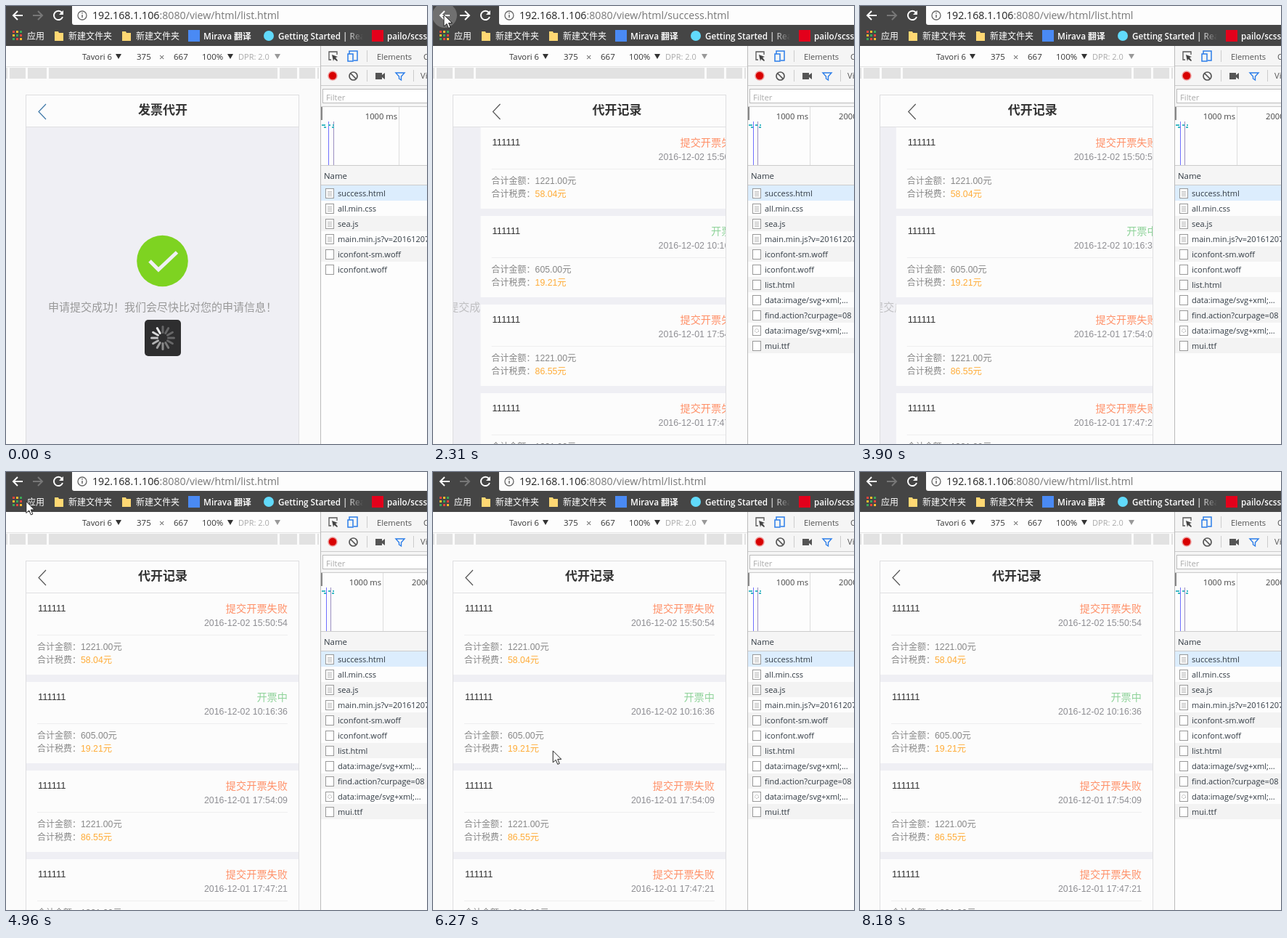
An HTML page for the animation above (8.67 s loop, 580 by 603 pixels).

```html
<!DOCTYPE html>
<html lang="zh">
<head>
<meta charset="utf-8">
<style>
html, body { margin: 0; width: 100%; height: 100%; overflow: hidden; background: #fbfbfb; }
svg { display: block; font-family: "Open Sans", "Noto Sans CJK SC", "Noto Sans CJK", sans-serif; }
.page { font-family: "Liberation Sans", "Noto Sans CJK SC", "Noto Sans CJK", sans-serif; }
.line { fill: none; }
</style>
</head>
<body>
<svg id="stage" width="580" height="603" viewBox="0 0 580 603"></svg>
<script>
const LOOP = 8670, SLIDE = 300, WIDTH = 376;
// Page slides, alternately list in and list out
const slides = [330, 2280, 3690, 5025, 5860, 7138, 7870];
// Pointer runs: [time, x, y]
const runs = [
  [[380, 232, 604], [600, 360, 500], [780, 436, 441], [1030, 436, 441], [1120, 405, 402], [1400, 130, 120],
   [1580, 33, 16], [1750, 33, 16], [2100, 15, 12], [2450, 15, 12], [2650, 17, 187], [3040, 232, 604]],
  [[4160, 232, 567], [4600, 100, 250], [5010, 18, 12], [5040, 18, 12], [5120, 17, 187], [5320, 232, 604]],
  [[6170, 232, 567], [6400, 80, 150], [6580, 27, 8], [6820, 27, 8], [6850, 31, 12], [7010, 31, 12],
   [7060, 18, 12], [7140, 18, 12], [7230, 17, 187], [7440, 232, 604]]
];
const hovers = [[1850, 2700], [4980, 5250], [7040, 7390]];

const text = (x, y, s, size = 11, fill = '#303942', more = '') =>
  `<text x="${x}" y="${y}" font-size="${size}" fill="${fill}" ${more}>${s}</text>`;
const rect = (x, y, w, h, fill, more = '') =>
  `<rect x="${x}" y="${y}" width="${w}" height="${h}" fill="${fill}" ${more}/>`;
const path = (d, stroke, width = 1, more = '') =>
  `<path class="line" d="${d}" stroke="${stroke}" stroke-width="${width}" ${more}/>`;
const shape = (d, fill) => `<path d="${d}" fill="${fill}"/>`;
const circle = (x, y, r, fill, more = '') => `<circle cx="${x}" cy="${y}" r="${r}" fill="${fill}" ${more}/>`;
const END = 'text-anchor="end"', BOLD = 'font-weight="bold"', SEMI = 'font-weight="600"';

// Label shown for inline pictures in the request list
const mime = 'image/svg+xml';
const inlineName = rest => ['data', mime].join(':') + ';' + rest;

function browserBar() {
  const folder = x => shape(`M${x} 35h5l1 2h6v11h-12z`, '#ffd873');
  const colors = ['#e8453c', '#f9bb2d', '#3aa757'];
  let apps = '';
  for (let i = 0; i < 9; i++)
    apps += rect(9 + i % 3 * 5, 34 + (i / 3 | 0) * 5, 3, 3, colors[(i + (i / 3 | 0)) % 3]);
  return rect(0, 0, 580, 55, '#454545') + circle(16, 13, 17, '#707070', 'id="hover"') +
    path('M23 13H10M16 7l-6 6 6 6', '#fff', 2) +
    path('M37 13H50M44 7l6 6-6 6', '#777', 2, 'id="next"') +
    path('M77 9a6.2 6.2 0 1 0 1 6', '#fff', 2) + shape('M79 6v6h-6z', '#fff') +
    rect(91, -4, 500, 30, '#fdfdfd', 'rx="3"') +
    circle(105, 13, 6, 'none', 'stroke="#666" stroke-width="1.3"') + path('M105 12v4M105 9v1.5', '#666', 1.5) +
    `<text x="119" y="18" font-size="14.2" fill="#222">192.168.1.106<tspan fill="#777" id="url"></tspan></text>` +
    apps + text(29, 46, '应用', 12, '#fff') +
    folder(67) + text(86, 46, '新建文件夹', 12, '#fff') +
    folder(160) + text(179, 46, '新建文件夹', 12, '#fff') +
    rect(251, 33, 16, 16, '#4a8af4') + text(272, 46, 'Mirava 翻译', 11.8, '#fff', SEMI) +
    circle(362, 41, 7, '#61dafb') + text(375, 46, 'Getting Started | Rea', 11.7, 'url(#fade)', SEMI) +
    rect(504, 33, 16, 16, '#e3001b') + text(525, 46, 'pailo/scss', 11.7, '#fff', SEMI);
}

function deviceBar() {
  const arrow = (x, fill) => shape(`M${x} 66h8l-4 7z`, fill);
  const ruler = [[0, 2], [5, 27], [30, 56], [59, 374], [377, 401], [404, 426], [429, 431]];
  return rect(0, 55, 433, 28, '#fdfdfd') + path('M0 83.5H433', '#e4e4e4') +
    text(146, 74, 'Tavori 6', 11.3, '#333', END) + arrow(151, '#333') +
    text(180, 74, '375', 11.5, '#333') + text(211, 75, '×', 13, '#666') + text(231, 74, '667', 11.5, '#333') +
    text(270, 74, '100%', 11.5, '#333') + arrow(305, '#333') +
    text(320, 74, 'DPR: 2.0', 11, '#aaa') + arrow(370, '#999') +
    ruler.map(([a, b]) => rect(a, 85, b - a, 15, '#e2e2e2')).join('');
}

const header = (title, id) => rect(28, 123, WIDTH, 43, '#fcfcfc') + path('M28 166.5h376', '#e0e0e2') +
  path('M55 135L45 145.5L55 156', '#555', 1.2, `id="${id}"`) +
  text(216, 149, title, 17, '#333', BOLD + ' text-anchor="middle"');

function successPage() {
  let spokes = '';
  for (let i = 0; i < 12; i++)
    spokes += path('M216 449.5v-8', '#fff', 3,
      `stroke-linecap="round" opacity="${Math.max(.27, (i - 1) / 11)}" transform="rotate(${i * 30} 216 457)"`);
  return header('发票代开', 'back1') + circle(215.5, 351, 35.3, '#7ed321') +
    path('M198 351L210 363L235.5 339', '#efeff4', 5) +
    text(58, 420, '申请提交成功！我们会尽快比对您的申请信息！', 15, '#999') +
    `<g id="loading">${rect(191, 432, 50, 50, '#2e2e2f', 'rx="5"')}<g id="spin">${spokes}</g></g>`;
}

function listPage() {
  const items = [
    ['02 15:50:54', '1221.00', '58.04'], ['02 10:16:36', '605.00', '19.21'],
    ['01 17:54:09', '1221.00', '86.55'], ['01 17:47:21', '1221.00', '58.04']];
  const card = ([date, sum, tax], i) => {
    const busy = i == 1;
    return `<g transform="translate(0 ${i * 122})">` + rect(28, 167, WIDTH, 112, '#fcfcfc') +
      text(44, 192, '111111', 13, '#333') +
      text(388, 193, busy ? '开票中' : '提交开票失败', 14.2, busy ? '#8fd39a' : '#ff9068', END) +
      text(388, 212, '2016-12-' + date, 12.4, '#8f8f94', END) +
      path('M43 224.5H388', '#eeeeef') +
      text(43, 245, '合计金额：', 12, '#888') + text(103, 245, sum + '元', 12.3, '#888') +
      text(43, 263, '合计税费：', 12, '#888') + text(103, 263, tax + '元', 12.3, '#ffac38') + '</g>';
  };
  return rect(28, 166, WIDTH, 437, '#efeff4') + header('代开记录', 'back2') + items.map(card).join('');
}

function devTools() {
  const files = ['success.html', 'all.min.css', 'sea.js', 'main.min.js?v=20161207', 'iconfont-sm.woff',
    'iconfont.woff', 'list.html', inlineName('...'), 'find.action?curpage=08', inlineName('...'), 'mui.ttf'];
  const row = (name, i) => {
    const y = 247 + i * 21;
    return `<g class="row">` + rect(434, y, 146, 21, i ? i % 2 ? '#fdfdfd' : '#f3f3f3' : '#dcedfd') +
      rect(440.5, y + 4.5, 11, 13, '#fff', 'stroke="#999"') +
      (i < 4 ? path(`M443 ${y + 8.5}h6m-6 2h6m-6 2h6m-6 2h6`, '#bbb') : '') +
      (i == 9 ? circle(446, y + 11, 2.5, 'none', 'stroke="#aaa" stroke-dasharray="2 1"') : '') +
      text(457, y + 15, name) + '</g>';
  };
  return rect(433, 55, 147, 548, '#fdfdfd') +
    rect(434, 55, 146, 55, '#f5f5f5') + path('M434 82.5h146M434 109.5h146', '#ccc') +
    path('M497.5 61v16M497.5 88v16M561.5 88v16', '#ccc') +
    path('M448 74h-3V63h11v4', '#555', 1.3) + shape('M449 67l8 3-3 1 3 4-1 1-4-3-1 3z', '#444') +
    path('M473 66v-4h11v13h-5M471 66h7v10h-7z', '#2b7de9', 1.5) +
    text(511, 74, 'Elements', 11.2, '#555') + text(575, 74, 'Console', 11.2, '#555') +
    circle(450, 96, 6, '#d80000', 'stroke="#e99" stroke-width="1.5"') +
    circle(478.5, 96.5, 5.5, 'none', 'stroke="#555" stroke-width="1.7"') + path('M475 93l7 7', '#555', 1.7) +
    shape('M509 92h9v3l4-3v9l-4-3v3h-9z', '#555') +
    path('M537 92h12l-4.5 5v5l-3-2v-3z', '#2b7de9', 1.4) + text(571, 100, 'View:', 11.2, '#555') +
    rect(434, 110, 146, 28, '#f5f5f5') + rect(436.5, 114.5, 160, 19, '#fff', 'stroke="#bbb"') +
    text(441, 130, 'Filter', 11.3, '#aaa') + path('M434 138.5h146M434 219.5h146', '#ccc') +
    `<g id="chart"></g>` + rect(434, 139, 2, 18, '#888') +
    rect(434, 220, 146, 27, '#f5f5f5') + text(438, 238, 'Name', 11.4) + path('M434 246.5h146', '#ccc') +
    files.map(row).join('') + path('M433.5 55v548', '#bbb');
}

function tooltip() {
  const lines = [inlineName('charset=utf8'), "y1='7' y2='27' stroke='%23fff'", "transform='rotate(30 60,60)'",
    "xlink:href='%23l' opacity='.27'", "transform='rotate(180 60,60)'", "xlink:href='%23l' opacity='.66'",
    "transform='rotate(330 60,60)'"];
  return `<g id="tip">` + rect(436.5, 461.5, 160, 110, '#f4f4f4', 'stroke="#b5b5b5" rx="3"') +
    lines.map((s, i) => text(445, 479 + i * 14, s, 11, '#575757')).join('') + '</g>';
}

const chart = (tick, a, b) => path(`M${tick + .5} 139v80`, '#ddd') +
  text(tick - 2, 156, '1000 ms', 11.2, '#444', END) + text(2 * tick - 479, 156, '2000 ms', 11.2, '#444') +
  path(`M${a + .5} 159v60`, '#7070ff') + path(`M${b + .5} 159v60`, '#9a8fc0') +
  path('M435 164h5m4 0h3m3 0h2M438 167h3m8 0h3', '#3bb8c4', 2);

const stage = document.getElementById('stage');
stage.innerHTML = `<defs>
  <clipPath id="screen">${rect(28, 123, 375, 480, '#000')}</clipPath>
  <linearGradient id="fade" gradientUnits="userSpaceOnUse" x1="465" x2="492">
    <stop stop-color="#fff"/><stop offset="1" stop-color="#454545"/></linearGradient></defs>` +
  rect(0, 0, 580, 603, '#fbfbfb') + browserBar() + deviceBar() +
  rect(27.5, 122.5, 376, 500, '#efeff4', 'stroke="#dedee0"') +
  `<g class="page" clip-path="url(#screen)">` + rect(28, 123, WIDTH, 43, '#fcfcfc') + path('M28 166.5h376', '#e0e0e2') +
  `<g id="success">${successPage()}</g><g id="list">${listPage()}</g></g>` +
  devTools() + tooltip() +
  `<path id="pointer" d="M0 0V16L4 12.5L6.5 18.5L9 17.5L6.5 11.5H11.5Z" fill="#fff" stroke="#222"/>`;

const $ = id => document.getElementById(id);
const show = (el, on) => el.style.display = on ? '' : 'none';
const move = (el, x, y = 0) => el.setAttribute('transform', `translate(${x} ${y})`);
const rows = [...document.querySelectorAll('.row')];
const charts = [chart(541, 444, 451), chart(519, 441, 447)];

// The CSS "ease" curve, solved by bisection
function ease(x) {
  if (x >= 1) return 1;
  let lo = 0, hi = 1, u = .5;
  for (let i = 0; i < 20; i++) {
    u = (lo + hi) / 2;
    if (.75 * u * (1 - u) + u ** 3 < x) lo = u; else hi = u;
  }
  return .3 * u * (1 - u) ** 2 + 3 * u * u * (1 - u) + u ** 3;
}

function pointerAt(t) {
  const run = runs.find(r => t >= r[0][0] && t < r[r.length - 1][0]);
  if (!run) return null;
  const i = run.findIndex(k => k[0] > t), [t0, x0, y0] = run[i - 1], [t1, x1, y1] = run[i];
  const k = (t - t0) / (t1 - t0);
  return [x0 + (x1 - x0) * k, y0 + (y1 - y0) * k];
}

let chartState = -1;
function draw(now) {
  const t = now % LOOP, started = t >= slides[0];
  const n = slides.filter(s => s <= t).length;
  const onList = !n || n % 2 == 1;
  const k = n ? ease((t - slides[n - 1]) / SLIDE) : 0;
  const p = n % 2 ? k : n ? 1 - k : 0;

  move($('list'), WIDTH * (1 - p));
  show($('list'), p > 0);
  move($('success'), -WIDTH * .2 * p);
  $('success').setAttribute('opacity', 1 - .5 * p);
  $('url').textContent = `:8080/view/html/${onList ? 'list' : 'success'}.html`;
  $('next').setAttribute('stroke', onList ? '#777' : '#fff');
  $('back1').setAttribute('stroke', started ? '#555' : '#3f78a8');
  show($('loading'), !started);
  $('spin').setAttribute('transform', `rotate(${Math.floor(t / 83.3) * 30} 216 457)`);

  const loaded = started ? Math.min(11, 7 + Math.floor((t - 330) / 90)) : 6;
  rows.forEach((r, i) => show(r, i < loaded));
  if (chartState != +started) $('chart').innerHTML = charts[chartState = +started];
  show($('tip'), t >= 840 && t < 1180);
  show($('hover'), hovers.some(([a, b]) => t >= a && t < b));

  const at = pointerAt(t);
  show($('pointer'), at);
  if (at) move($('pointer'), ...at);
}

function frame() {
  draw(performance.now());
  requestAnimationFrame(frame);
}
frame();
</script>
</body>
</html>
```
